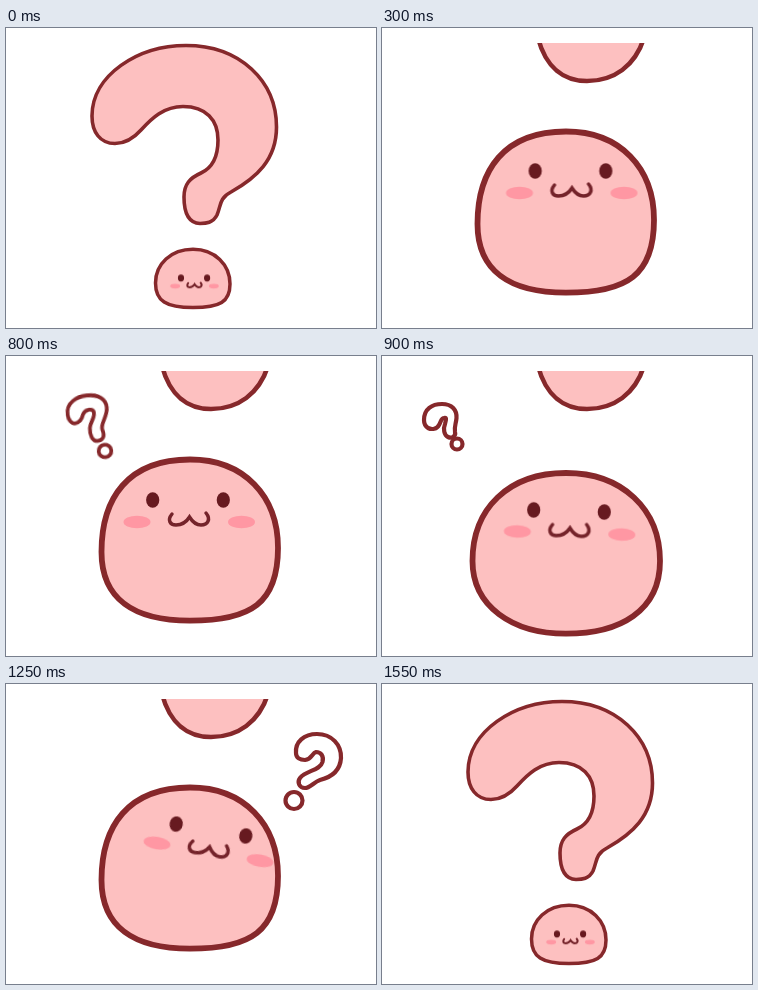
Recreate the animation shown at these times as an HTML page without scripts. Size 370x300 px, loop 2100 ms.

```html
<!DOCTYPE html>
<html lang="en">
<head>
<meta charset="utf-8">
<title>Curious blob</title>
<style>
html, body { margin: 0; width: 100%; height: 100%; overflow: hidden; background: #fff; }
svg { display: block; width: 370px; height: 300px; clip-path: inset(15px 0 0); }

.skin { fill: #fdc0c0; stroke: #86282b; stroke-linejoin: round; }
.near .skin { stroke-width: 5.8px; }
.near .stem { stroke-width: 4.6px; }
.eye { fill: #671a20; stroke: #671a20; stroke-width: var(--eye, 0px); }
.blush { fill: #ff97a3; }
.mouth { fill: none; stroke: #74232a; stroke-width: var(--lip, 3.5px); stroke-linecap: round; }
.query { fill: #fff; stroke: #86282b; stroke-width: 4.2px; stroke-linejoin: round; }

/* Every pose is held, then swapped */
.far, .near, .mark, .dot, .wide, .tall, .face, .q-left, .q-away, .q-right {
  animation: 2100ms step-end infinite;
}
.far { animation-name: far; }
.near { animation-name: near; }
.mark { animation-name: mark; transform-origin: 190px 274px; }
.dot { animation-name: dot; transform-origin: 192px 280px; }
.wide { animation-name: wide; }
.tall { animation-name: tall; }
.face { animation-name: face; }
.q-left { animation-name: q-left; transform-origin: 124px 100px; }
.q-away { animation-name: q-away; }
.q-right { animation-name: q-right; transform-origin: 288px 116px; }

@keyframes far { 0%, 69.04%, 100% { opacity: 1 } 9.52% { opacity: 0 } }
@keyframes near { 0%, 69.04%, 100% { opacity: 0 } 9.52% { opacity: 1 } }

@keyframes mark {
  0%, 73.8%, 100% { transform: scale(1); stroke-width: 3.6px }
  4.76% { transform: scale(2.4); stroke-width: 1.9px }
  7.14% { transform: scale(2.6); stroke-width: 1.8px }
  69.04% { transform: scale(2); stroke-width: 2.1px }
  71.42% { transform: scale(1.05); stroke-width: 3.4px }
}
@keyframes dot {
  0%, 73.8%, 100% { transform: scale(1); stroke-width: 3.5px }
  4.76% { transform: scale(2.05); stroke-width: 2.3px }
  7.14% { transform: scale(2.3); stroke-width: 2.3px }
  69.04% { transform: scale(1.86); stroke-width: 2.3px }
  71.42% { transform: scale(1.05); stroke-width: 3.4px }
}

@keyframes wide {
  0%, 19.04%, 28.57%, 42.85%, 52.38%, 64.28%, 100% { opacity: 1 }
  14.28%, 23.8%, 38.09%, 47.61%, 59.52% { opacity: 0 }
}
@keyframes tall {
  0%, 19.04%, 28.57%, 42.85%, 52.38%, 64.28%, 100% { opacity: 0 }
  14.28%, 23.8%, 38.09%, 47.61%, 59.52% { opacity: 1 }
}

@keyframes face {
  0%, 73.8%, 100% { transform: translate(188px, 250px) scale(.37); --eye: 3.5px; --lip: 5.5px }
  4.76% { transform: translate(187px, 187px) scale(.75) }
  7.14% { transform: translate(187px, 176px) scale(.85) }
  9.52% { transform: translate(186px, 155px) }
  14.28% { transform: translate(188.5px, 143px) }
  19.04% { transform: translate(183px, 155px) rotate(-1deg) }
  23.8% { transform: translate(176px, 144px) rotate(-3deg) }
  28.57% { transform: translate(174.2px, 155.5px) rotate(-4.5deg) }
  33.33% { transform: translate(176px, 155.5px) rotate(-3deg) }
  38.09% { transform: translate(182px, 144px) }
  42.85% { transform: translate(187px, 155px) rotate(1.7deg) }
  47.61% { transform: translate(192px, 144px) rotate(4deg) }
  50% { transform: translate(196px, 144px) rotate(6deg) }
  52.38% { transform: translate(200px, 157px) rotate(8deg) }
  54.76% { transform: translate(203px, 158px) rotate(9deg) }
  59.52% { transform: translate(205px, 146px) rotate(9.7deg) }
  64.28% { transform: translate(190px, 155px) rotate(2deg) }
  69.04% { transform: translate(186.5px, 197.5px) rotate(1.5deg) scale(.67) }
  71.42% { transform: translate(187.5px, 248px) scale(.39); --eye: 3.5px; --lip: 5.5px }
  4.76%, 7.14%, 9.52%, 14.28%, 19.04%, 23.8%, 28.57%, 33.33%, 38.09%, 42.85%, 47.61%,
  50%, 52.38%, 54.76%, 59.52%, 64.28%, 69.04% { --eye: 0px; --lip: 3.5px }
}

@keyframes q-left {
  0%, 42.85%, 100% { opacity: 0; transform: none }
  23.8% { opacity: 1; transform: scale(.6) }
  28.57% { opacity: 1; transform: none }
  38.09% { opacity: 1; transform: translate(-25px, -5px) rotate(-6deg) scale(.9) }
}
@keyframes q-away { 0%, 47.61%, 100% { opacity: 0 } 42.85% { opacity: 1 } }
@keyframes q-right {
  0%, 64.28%, 100% { opacity: 0; transform: none }
  50% { opacity: 1; transform: scale(.4) }
  52.38% { opacity: 1; transform: scale(.75) }
  54.76% { opacity: 1; transform: none }
}
</style>
</head>
<body>
<svg width="370" height="300" viewBox="0 0 370 300">
  <g class="far">
    <g class="mark">
      <path class="skin" d="M86,88C86,47 132,17.5 180,17.5C234,17.5 270.5,53 270.5,99C270.5,132 250,150 225,164C213,170 215,178 211,187C207,195 200,195.5 194,195.5C182,195 178,183 178,169C178,156 184,150 195,145C206,140 212,130 212,112C212,92 200,78.5 177,78.5C158,78.5 146,90 135,102C127,111 119,115.5 109,115.5C94,115.5 86,104 86,88Z"/>
    </g>
    <g class="dot">
      <path class="skin" d="M187,221.3C209,221.3 224,237 224,256C224,274 214,279.6 187,279.6C160,279.6 149.5,273 149.5,255C149.5,236 165,221.3 187,221.3Z"/>
    </g>
  </g>

  <g class="near">
    <path class="skin stem" d="M156,10C164,40 182,53 205,53C232,53 253,38 262,10"/>
    <path class="skin wide" d="M184,117C240,117 278,153 278,205C278,255 238,277.7 184,277.7C130,277.7 90.5,250 90.5,205C90.5,153 126,117 184,117Z"/>
    <path class="skin tall" d="M184,103.5C238,103.5 272,140 272,192C272,247 245,264.7 184,264.7C128,264.7 95.5,243 95.5,196C95.5,142 122,103.5 184,103.5Z"/>
  </g>

  <g class="face">
    <ellipse class="blush" cx="-51" cy="22" rx="13.5" ry="6.2"/>
    <ellipse class="blush" cx="53.5" cy="22" rx="13.5" ry="6.2"/>
    <ellipse class="eye" cx="-35.3" rx="6.6" ry="7.7"/>
    <ellipse class="eye" cx="35.3" rx="6.6" ry="7.7"/>
    <path class="mouth" d="M-16,14C-21,20 -18,25 -12,25C-6,25 -1,21 1.5,17C4,21 8,25 13,25C20,25 23,19 18,13"/>
  </g>

  <g class="query q-left">
    <path d="M87,56C86,42 100,36.5 110,36.5C124,36.5 131,43 131,52C131,62 122,69 123.5,76C126,84 123,88 117,88C111,88 109,80 110,73C111,66 118,61 116,55C114,51 106,52 104,57C102,63 98,66 94,66C90,66 87,61 87,56Z"/>
    <circle cx="124" cy="100" r="7"/>
  </g>
  <g class="query q-away">
    <path d="M42,64C42,53 50,48 60,48C70,48 75,54 74.5,62C74,68 72,71 73,76C74,80 70,83 66,81C62,79 61,73 63,68C64,64 65,61 62,62C59,62 59,66 57,69C55,73 50,74 46,72C43,70 42,67 42,64Z"/>
    <circle cx="75" cy="88" r="5.5"/>
  </g>
  <g class="query q-right">
    <path d="M290,69C289,58 298,50 311,50C326,50 335.5,61 335,74C334,89 322,94 314,96C308,98 304,104 299,104C293,104 291,98 294,94C300,86 314,87 316.5,78C318,72 315,68 310,68C306,69 306,75 299,76C294,76 290,74 290,69Z"/>
    <circle cx="288" cy="116.5" r="8.5"/>
  </g>
</svg>
</body>
</html>
```
